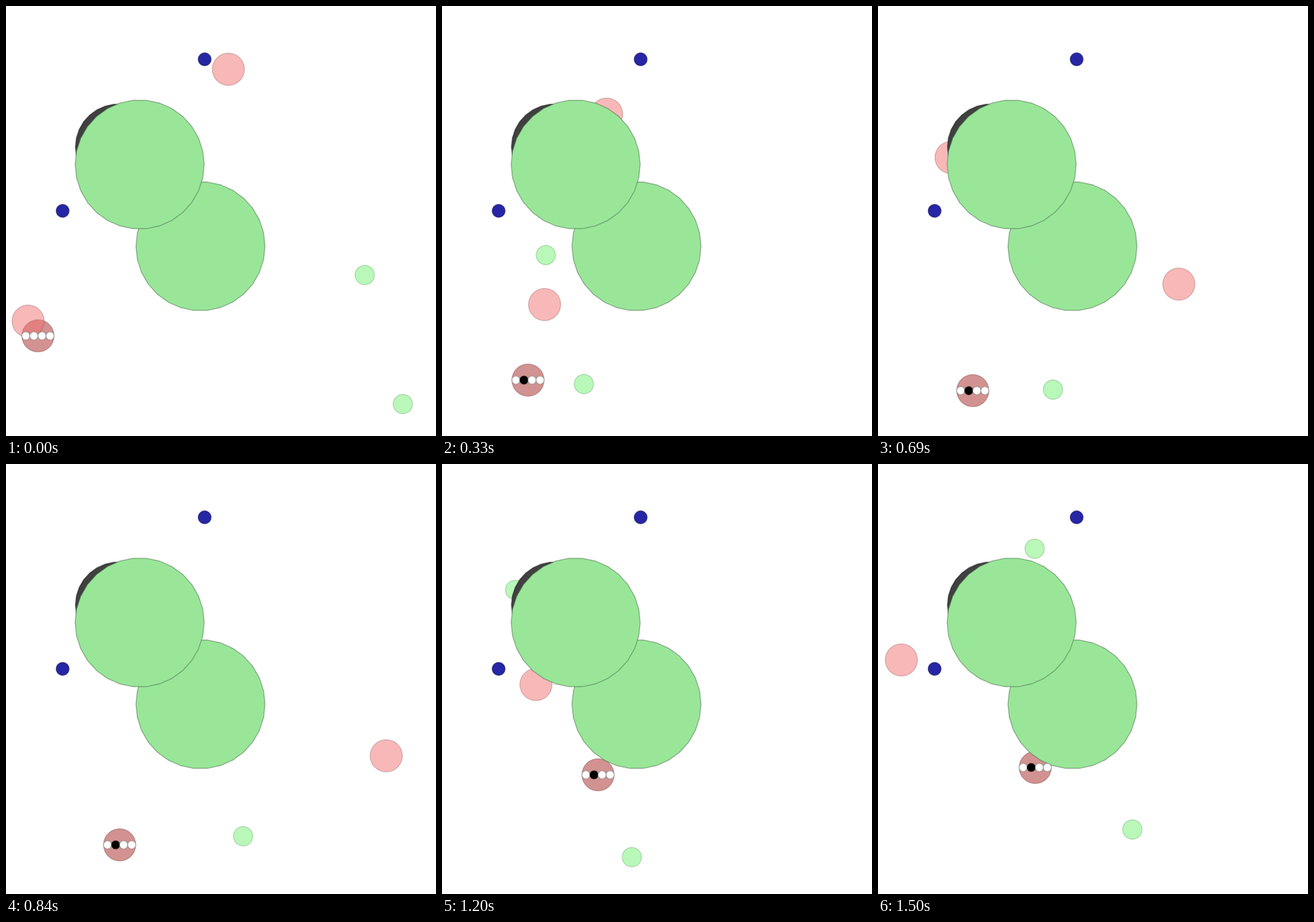
An HTML page with a canvas that plays this animation: 700x700 px, repeating every 1530 ms.

```html
<!DOCTYPE html>
<html>
<head>
<meta charset="utf-8">
<style>
  html, body { margin: 0; width: 100%; height: 100%; overflow: hidden; background: #fff; }
  canvas { display: block; width: 700px; height: 700px; }
</style>
</head>
<body>
<canvas id="stage" width="700" height="700"></canvas>
<script>
const ctx = document.getElementById('stage').getContext('2d');
const STEP = 30, STEPS = 51, TAU = Math.PI * 2;

// Steps at which every agent reaches its next key point
const BEATS = [0, 4, 11, 18, 28, 40, 50];

const agent = (r, color, path) => ({ r, color, alpha: 0.5, path });
const chaser = (...path) => agent(26.25, [242, 115, 115], path);
const fixed = (x, y, r, color) => ({ r, color, alpha: 1, path: [[x, y]] });
const food = (x, y) => fixed(x, y, 10.5, [38, 38, 166]);
const forest = (x, y) => fixed(x, y, 105, [153, 230, 153]);

// Runners open with the same dash to the left at top speed, then part ways
const runner = (x, y, ...rest) => agent(15.75, [115, 242, 115],
  [[x, y], [x - 182, y], [x - 415, y - 32.5], ...rest]);

const leader = agent(26.25, [166, 38, 38],
  [[52, 537], [139, 576], [140, 609], [131, 618], [185, 620], [254, 506], [256, 494]]);

const bodies = [
  leader,
  chaser([362, 103], [429, 200], [375, 365], [370, 420], [619, 475], [770, 470]),
  chaser([36, 513], [157, 475], [167, 486], [47, 466], [-120, 430]),
  chaser([200, 240], [214, 146], [268, 176], [110, 235], [150, 260], [153, 359], [38, 319]),
  runner(584, 438, [150, 250], [-150, 100], [119, 205], [255, 138]),
  runner(646, 648, [176, 644], [386, 606], [309, 640], [414, 595]),
  fixed(183, 229.5, 70, [64, 64, 64]),
  food(323.4, 86.8),
  food(92.2, 333.5),
  forest(316.6, 391),
  forest(217.6, 258)
];

function slope(path, i, axis) {
  const a = Math.max(i - 1, 0), b = Math.min(i + 1, path.length - 1);
  return (path[b][axis] - path[a][axis]) / (BEATS[b] - BEATS[a]);
}

// Smooth curve through the key points, held after the last one
function position(path, s) {
  const i = BEATS.findLastIndex(b => b <= s);
  if (i >= path.length - 1) return path[path.length - 1];
  const h = BEATS[i + 1] - BEATS[i], u = (s - BEATS[i]) / h, v = 1 - u;
  return [0, 1].map(k =>
    v * v * (1 + 2 * u) * path[i][k] + u * u * (3 - 2 * u) * path[i + 1][k] +
    h * u * v * (v * slope(path, i, k) - u * slope(path, i + 1, k)));
}

// Thirty-sided disc with a rim in half its colour and opacity
function disc(x, y, r, color, alpha) {
  ctx.beginPath();
  for (let i = 0; i < 30; i++) {
    const a = i * TAU / 30;
    ctx.lineTo(x + r * Math.cos(a), y + r * Math.sin(a));
  }
  ctx.closePath();
  ctx.fillStyle = `rgba(${color}, ${alpha})`;
  ctx.fill();
  ctx.strokeStyle = `rgba(${color.map(c => c / 2 | 0)}, ${alpha / 2})`;
  ctx.lineWidth = 1.6;
  ctx.stroke();
}

function signal(s) {
  if (s < 8) return -1;
  return s >= 15 && s < 23 ? 2 : 1;
}

function draw(s) {
  ctx.fillStyle = '#fff';
  ctx.fillRect(0, 0, 700, 700);
  for (const b of bodies) disc(...position(b.path, s), b.r, b.color, b.alpha);

  const [x, y] = position(leader.path, s), lit = signal(s);
  for (let i = 0; i < 4; i++) {
    const c = i === lit ? 0 : 255;
    disc(x + (i - 1.5) * leader.r / 2, y, leader.r / 4, [c, c, c], 1);
  }
}

const start = performance.now();
function tick() {
  draw(Math.floor((performance.now() - start) / STEP) % STEPS);
  requestAnimationFrame(tick);
}
tick();
</script>
</body>
</html>
```
